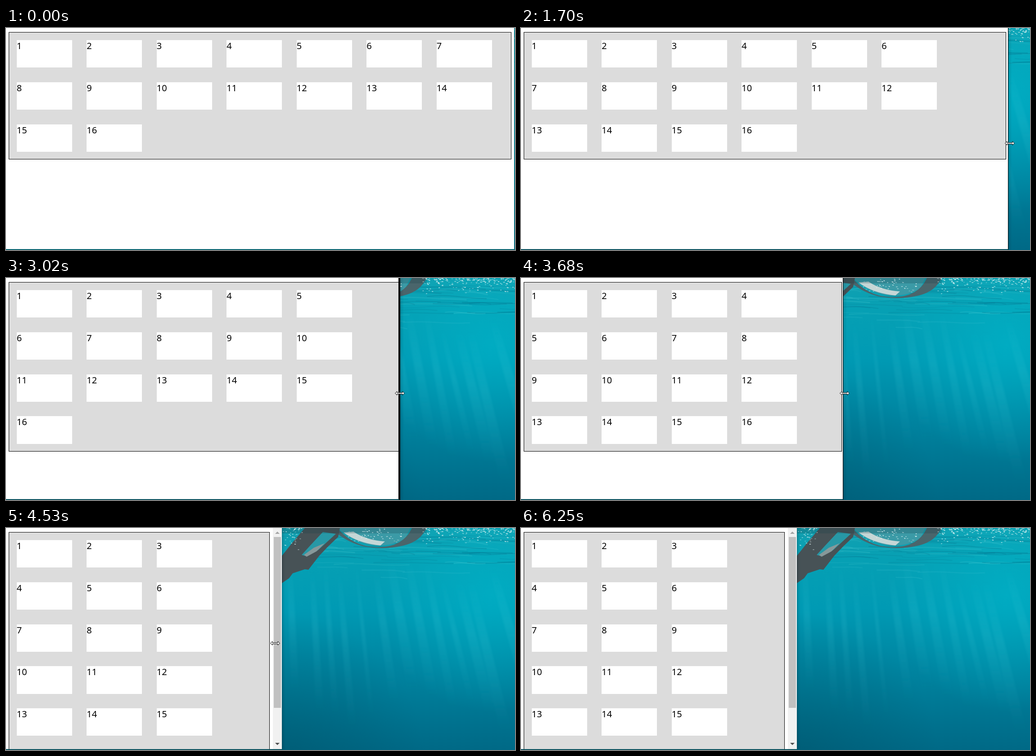
An HTML page for the animation above (6330 ms loop, 1131 by 495 pixels).

```html
<!DOCTYPE html>
<html lang="en">
<head>
<meta charset="utf-8">
<title>Wrapping boxes in a resized window</title>
<style>
  html, body { margin: 0; width: 100%; height: 100%; overflow: hidden; }
  body { position: relative; background: #007f9b; }
  svg { position: absolute; overflow: visible; }
  #sea { left: 0; top: 0; width: 1131px; height: 495px; overflow: hidden; }
  #win {
    position: absolute; left: 0; top: 0; height: 495px; box-sizing: border-box;
    overflow: hidden; background: #fff; border-right: 1px solid #087984;
    border-bottom: 2px solid #00606c; box-shadow: 0 0 7px rgba(0, 20, 30, .45);
  }
  #win.active { border-right-color: #000; border-bottom-color: #034d5b; }
  #list {
    position: absolute; left: 6px; top: 9px; box-sizing: border-box;
    display: flex; flex-wrap: wrap; align-content: flex-start;
    padding: 1px 0 0 .7px; background: #dcdcdc; border: 1px solid #000;
  }
  #list div {
    flex: none; width: 123.1px; height: 61.3px; margin: 16px 16.43px 16.5px 16px;
    background: #fff; color: #000;
    font: 20px/26px "Noto Sans", "Open Sans", sans-serif;
  }
  #bar { position: absolute; right: 0; top: 0; width: 20px; height: 493px; background: #f1f1f1; }
  #thumb { position: absolute; left: 2px; top: 20px; width: 16px; height: 381px; background: #c1c1c1; }
  #thumb.hover { background: #a8a8a8; }
  #bar svg { left: 0; top: 0; }
  .cursor { left: 0; top: 0; width: 1px; height: 1px; }
  .cursor path { fill: #fff; stroke: #000; }
</style>
</head>
<body>
<svg id="sea" viewBox="0 0 1131 495">
  <defs>
    <linearGradient id="depth" x2="0" y2="1">
      <stop offset="0" stop-color="#13a0b0"/>
      <stop offset=".14" stop-color="#06a0b4"/>
      <stop offset=".36" stop-color="#009ab4"/>
      <stop offset=".62" stop-color="#0085a1"/>
      <stop offset="1" stop-color="#006986"/>
    </linearGradient>
    <radialGradient id="glow" gradientUnits="userSpaceOnUse" cx="1080" cy="150" r="260">
      <stop offset="0" stop-color="#00b6cb" stop-opacity=".6"/>
      <stop offset="1" stop-color="#00b6cb" stop-opacity="0"/>
    </radialGradient>
    <radialGradient id="shade" gradientUnits="userSpaceOnUse" cx="600" cy="520" r="330">
      <stop offset="0" stop-color="#004a5e" stop-opacity=".4"/>
      <stop offset="1" stop-color="#004a5e" stop-opacity="0"/>
    </radialGradient>
    <linearGradient id="ray" x2="0" y2="1">
      <stop offset="0" stop-color="#5fe0ea" stop-opacity="0"/>
      <stop offset=".4" stop-color="#5fe0ea" stop-opacity=".1"/>
      <stop offset="1" stop-color="#5fe0ea" stop-opacity="0"/>
    </linearGradient>
    <filter id="soft"><feGaussianBlur stdDeviation="2"/></filter>
  </defs>
  <rect width="1131" height="495" fill="url(#depth)"/>
  <rect width="1131" height="495" fill="url(#glow)"/>
  <rect width="1131" height="495" fill="url(#shade)"/>
  <g id="rays" fill="url(#ray)" filter="url(#soft)"></g>
  <g id="waves" fill="none"></g>
  <path d="M742 4Q775 34 818 39Q862 41 888 22L898 0H738Z" fill="#3b9aa6"/>
  <path d="M750 10Q782 34 832 39L842 30Q800 27 772 8Z" fill="#c5d6d6"/>
  <path d="M738 2Q770 38 812 42Q880 48 902 0H934Q921 30 884 39Q840 49 800 42Q762 34 733 10Z" fill="#4a656b"/>
  <path d="M664 0H742L738 20Q716 40 696 62L672 93L664 92L637 101L629 112L613 123V62L636 33Z" fill="#475256"/>
  <path d="M704 9L733 13L694 49L668 63L657 60L676 39Z" fill="#2798a6"/>
  <path d="M662 60L684 44L708 34L690 52L668 64Z" fill="#87989a"/>
  <rect x="613" width="322" height="12" fill="#123c46" opacity=".22"/>
  <g id="foam"></g>
</svg>

<div id="win">
  <div id="list"></div>
  <div id="bar">
    <div id="thumb"></div>
    <svg width="20" height="493">
      <path d="M5 13L10 8L15 13Z" fill="#a3a3a3"/>
      <path d="M5 479L10 484L15 479Z" fill="#505050"/>
    </svg>
  </div>
</div>

<svg class="cursor" id="sizer"><path d="M-10.5 0L-6 -4.2V-1.4H6V-4.2L10.5 0L6 4.2V1.4H-6V4.2Z"/></svg>
<svg class="cursor" id="arrow"><path d="M.5 .5V16.5L4.2 13L6.6 18.5L9 17.5L6.6 12H11.5Z"/></svg>

<script>
const LOOP = 6330, STEP = 76.5, DRAG = 1470, MIN_EDGE = 613;
const $ = id => document.getElementById(id);
const [win, list, bar, thumb, sizer, arrow] =
  ['win', 'list', 'bar', 'thumb', 'sizer', 'arrow'].map($);

// Pointer-driven window edge: [drag step, x]
const edgePath = [[-1, 1130], [0, 1122], [1, 1104], [2, 1085], [3, 1083], [8, 1050],
  [11, 1012], [12, 1001], [17, 917], [19, 897], [20, 876], [26, 760], [28, 720],
  [29, 716], [35, 670], [40, 595]];
const enterX = [[0, 1078], [3, 1088], [8, 1130]];
const enterY = [[0, 461], [3, 385], [8, 263]];
const leaveX = [[-1, 598], [0, 626], [1, 700], [3, 903], [5, 1065]];
const leaveY = [[-1, 257], [0, 258], [1, 268], [3, 320], [5, 476]];

function at(path, x) {
  if (x <= path[0][0]) return path[0][1];
  for (let i = 1; i < path.length; i++) {
    const [x0, y0] = path[i - 1], [x1, y1] = path[i];
    if (x <= x1) return y0 + (y1 - y0) * (x - x0) / (x1 - x0);
  }
  return path[path.length - 1][1];
}

const stepOf = (t, start) => Math.floor((t - start) / STEP + .1);

function place(el, x, y, shown) {
  el.style.display = shown ? 'block' : 'none';
  el.style.transform = `translate(${Math.round(x)}px, ${y}px)`;
}

function draw(t) {
  const k = Math.max(-1, stepOf(t, DRAG));
  const pos = Math.round(at(edgePath, k));
  const last = Math.round(at(edgePath, k - 1));
  const edge = Math.max(MIN_EDGE, pos);
  const border = last - pos > 19 ? 4 : 1;

  // The page layout trails the window edge by one step
  let right = Math.max(MIN_EDGE, k >= 40 ? pos : last) - 7;
  const scrolls = right < 632;
  if (scrolls) right -= 20;

  win.className = t >= 1210 ? 'active' : '';
  win.style.width = edge + 'px';
  win.style.borderRightWidth = (scrolls ? 0 : border) + 'px';
  list.style.width = right - 6 + 'px';
  bar.style.display = scrolls ? 'block' : 'none';
  thumb.className = t >= 5000 && t < 5150 ? 'hover' : '';

  place(sizer, pos + (k < 0 ? 4 : border > 1 ? -1 : 3), 257, t >= 910 && t < 5000);
  if (t < 1000) {
    const e = stepOf(t, 70);
    place(arrow, at(enterX, e), Math.round(at(enterY, e)), t >= 70 && t < 750);
  } else {
    const l = Math.max(-1, stepOf(t, 5150));
    place(arrow, at(leaveX, l), Math.round(at(leaveY, l)), t >= 5000 && t < 5620);
  }
}

function shape(parent, d, attrs) {
  const p = document.createElementNS('http://www.w3.org/2000/svg', 'path');
  p.setAttribute('d', d);
  for (const name in attrs) p.setAttribute(name, attrs[name]);
  $(parent).append(p);
}

function paintSea() {
  let seed = 11;
  const rnd = () => (seed = seed * 16807 % 2147483647) / 2147483647;

  for (let i = 0; i < 13; i++) {
    const x = 625 + i * 36 + rnd() * 16, lean = 8 + i * 6, w = 5 + rnd() * 14;
    const y = 70 + rnd() * 50, end = y + 270 + rnd() * 90;
    shape('rays', `M${x} ${y}h${w}L${x + lean + w * 1.6} ${end}h${-w * 1.6}Z`);
  }
  for (let i = 0; i < 64; i++) {
    const x = 600 + rnd() * 500, y = 18 + rnd() * rnd() * 115, w = 50 + rnd() * 130;
    shape('waves', `M${x} ${y}q${w / 4} ${rnd() * 8 - 4} ${w / 2} 0t${w / 2} ${rnd() * 5}`, {
      stroke: rnd() < .6 ? '#006f88' : '#49c6d0',
      'stroke-width': 1 + rnd() * 2, opacity: .12 + rnd() * .16
    });
  }
  const fleck = (x, y) => shape('foam',
    `M${x} ${y}l${1 + rnd() * 3} ${rnd() * 2 - 1}l${rnd() * 2} 1.2l-3 .5Z`,
    { fill: '#e2f5f5', opacity: .35 + rnd() * .6 });
  for (let i = 0; i < 190; i++) fleck(925 + rnd() * 206, rnd() * rnd() * 38);
  for (let i = 0; i < 40; i++) fleck(614 + rnd() * 42, rnd() * rnd() * 52);
  for (let i = 0; i < 45; i++) fleck(755 + rnd() * 125, rnd() * 32);
}

for (let i = 1; i <= 16; i++) {
  const box = document.createElement('div');
  box.textContent = i;
  list.append(box);
}
paintSea();

const start = performance.now();
(function tick() {
  draw((performance.now() - start) % LOOP);
  requestAnimationFrame(tick);
})();
</script>
</body>
</html>
```
